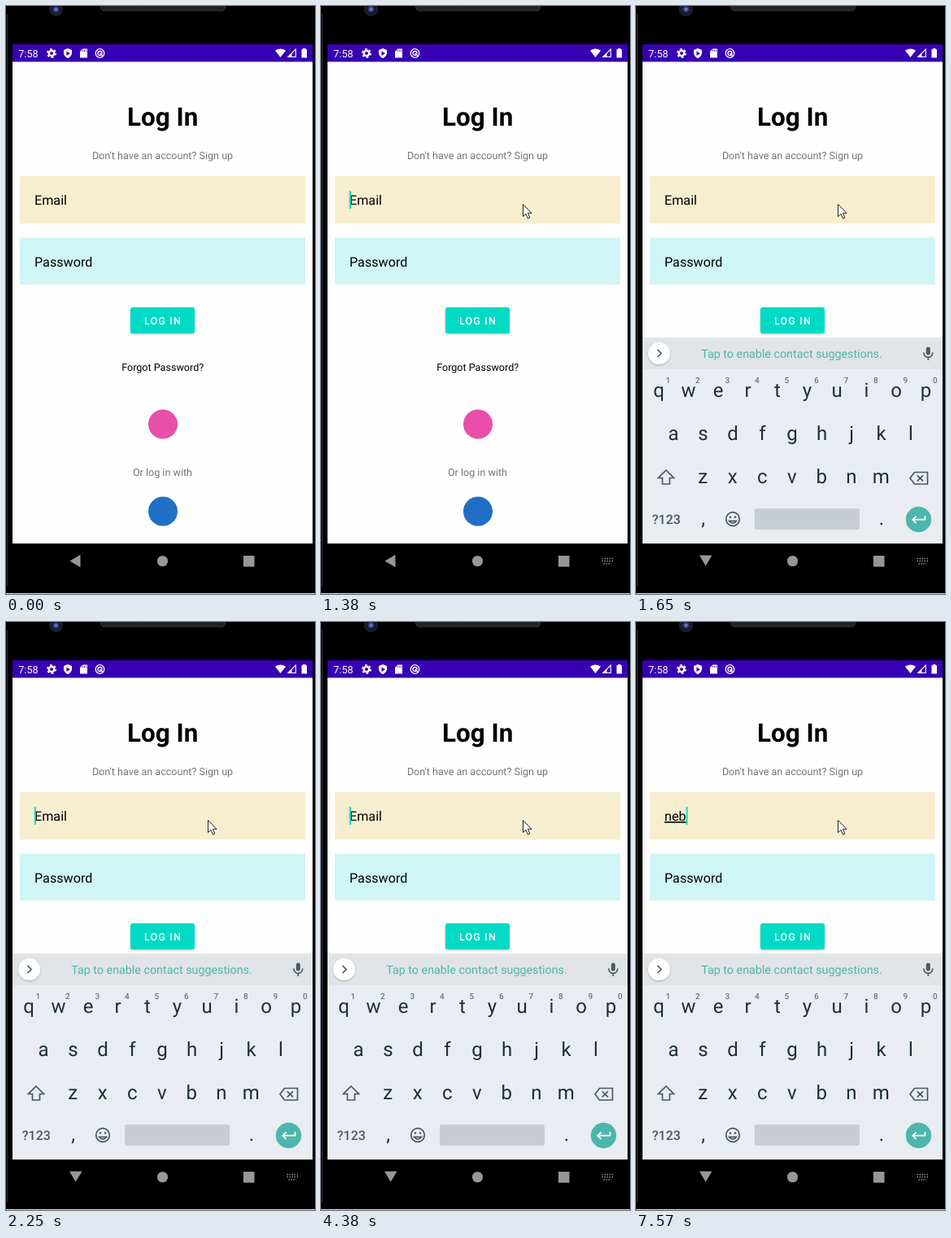
An HTML page for the animation above (8 s loop, 380x722 px).

```html
<!DOCTYPE html>
<html lang="en">
<head>
<meta charset="utf-8">
<title>Log in screen</title>
<style>
html, body { margin: 0; width: 100%; height: 100%; overflow: hidden; background: #000; }
svg { display: block; width: 380px; height: 722px; font-family: Roboto, "Noto Sans", sans-serif; text-rendering: geometricPrecision; }
.mid { text-anchor: middle; }
.small { font-size: 12.57px; }
.field { font-size: 16.16px; }
.grey { fill: #757575; }
.line { fill: none; stroke: #4b585f; stroke-width: 1.7; }
.hide { display: none; }
</style>
</head>
<body>
<svg viewBox="0 0 380 722">
  <defs>
    <radialGradient id="lens">
      <stop offset="0" stop-color="#8f9be0"/>
      <stop offset=".3" stop-color="#34408c"/>
      <stop offset=".6" stop-color="#12152c"/>
      <stop offset="1" stop-color="#25262a"/>
    </radialGradient>
    <filter id="soft" x="-20%" y="-20%" width="140%" height="150%">
      <feDropShadow dx="0" dy="1" stdDeviation="1" flood-opacity=".28"/>
    </filter>
  </defs>

  <!-- phone body -->
  <rect width="380" height="722"/>
  <rect x="1" y="10" width="1" height="702" fill="#343434"/>
  <rect y="721" width="380" height="1" fill="#d5d5d5"/>
  <circle cx="61.5" cy="4" r="8.5" fill="url(#lens)"/>
  <path d="M116 0H270V2Q269 6.5 264 6.5H122Q117 6.5 116 2Z" fill="#29292b"/>
  <path d="M119 2.5H267" stroke="#111" stroke-width="2" stroke-dasharray="1.5 1.5"/>

  <!-- screen -->
  <rect x="8" y="47" width="369" height="613" fill="#fefefe"/>
  <rect x="8" y="47" width="369" height="21.5" fill="#3700b3"/>
  <g fill="#fff">
    <text class="small" x="15.3" y="62.5">7:58</text>
    <g fill="none" stroke="#fff">
      <circle cx="56" cy="58" r="3.2" stroke-width="2.4"/>
      <circle cx="56" cy="58" r="5.1" stroke-width="1.7" stroke-dasharray="2.67 2.67"/>
      <circle cx="115.5" cy="58" r="5.3" stroke-width="1.3"/>
      <circle cx="115.5" cy="58" r="2.5" stroke-width="1.3"/>
      <path d="M115.5 58L119 61.5" stroke-width="1.3"/>
    </g>
    <path d="M76 52L81 54V58Q80.500 62 76 64.200Q71.500 62 71 58V54Z"/>
    <path d="M74.500 55.500L79 58.200L74.500 61Z" fill="#3700b3"/>
    <path d="M94.500 52.500H100V63.500H91V56Z"/>
    <path d="M94.500 54V56M96.500 54V56M98.500 54V56" stroke="#3700b3" stroke-width=".8"/>
    <path d="M331 54.800Q337.500 50.200 344 54.800L337.500 63Z"/>
    <path d="M356.300 53V62.500H346.800Z" fill="none" stroke="#fff" stroke-width="1.100"/>
    <path d="M351.500 58V62.500H346.800Z"/>
    <path d="M365 52H368.500V53.200H370V63.500H363.500V53.200H365Z"/>
  </g>

  <text class="mid" x="192.700" y="147" font-size="31.400" font-weight="700">Log In</text>
  <text class="mid small grey" x="192.500" y="187.500">Don't have an account? Sign up</text>
  <rect x="17" y="209" width="351" height="58" fill="#f7eed0"/>
  <rect x="17" y="284.500" width="351" height="57.500" fill="#d0f5f6"/>
  <text class="field" id="hint" x="35" y="244">Email</text>
  <text class="field hide" id="typed" x="35" y="244" text-decoration="underline">neb</text>
  <text class="field" x="35" y="319.500">Password</text>
  <rect id="caret" x="35" y="227" width="1.800" height="22" fill="#03dac5"/>

  <rect x="153" y="370" width="79" height="32" rx="3" fill="#03dac5" filter="url(#soft)"/>
  <text class="mid small" x="193" y="390.700" fill="#fff" font-weight="500" letter-spacing="1.120">LOG IN</text>
  <text class="mid small" x="192.700" y="448">Forgot Password?</text>
  <circle cx="193" cy="513.500" r="18" fill="#e94fa8"/>
  <text class="mid small grey" x="192.500" y="577">Or log in with</text>
  <circle cx="193" cy="620.500" r="18" fill="#1f6fc5"/>

  <!-- navigation bar -->
  <g fill="#979797">
    <path id="back"/>
    <circle cx="192.500" cy="681.500" r="6.600"/>
    <rect x="292" y="675" width="13.500" height="13.500"/>
    <path id="keysIcon" d="M345.500 678.500H359M345.500 681.500H359M347.500 684.800H357" stroke="#979797" stroke-width="1.500" stroke-dasharray="1.500 1.500"/>
  </g>

  <g id="board">
    <rect x="8" y="407" width="369" height="253" fill="#e9edf1"/>
    <rect x="8" y="407" width="369" height="39" fill="#e0e4e7"/>
    <circle cx="28.500" cy="426.500" r="13.500" fill="#fff" filter="url(#soft)"/>
    <path class="line" d="M26.500 422L31 426.500L26.500 431"/>
    <text class="mid" x="191.500" y="432" font-size="14.300" fill="#4db6ac">Tap to enable contact suggestions.</text>
    <rect x="356.800" y="418.500" width="5" height="10" rx="2.500" fill="#4b585f"/>
    <path class="line" d="M353.800 425.500Q354.300 431.300 359.300 431.300T364.800 425.500M359.300 431V435" stroke-width="1.400"/>
    <g id="keys" fill="#1f2f37"></g>
    <path class="line" d="M37 570L46.500 579.500H41.500V587H32.500V579.500H27.500Z"/>
    <path class="line" d="M342.500 572.500H358.500V587H342.500L337 579.800Z"/>
    <path class="line" d="M345.800 576.300L353 583.400M353 576.300L345.800 583.400"/>
    <circle class="line" cx="119" cy="630" r="8.300"/>
    <path class="line" d="M114.500 632.300Q119 638 123.500 632.300Z" stroke-width="1"/>
    <circle cx="116" cy="627.500" r="1.300" fill="#4b585f"/>
    <circle cx="122" cy="627.500" r="1.300" fill="#4b585f"/>
    <rect x="146" y="617" width="129" height="26" rx="3" fill="#c8cdd1"/>
    <circle cx="347.500" cy="630.500" r="15.700" fill="#4db6ac"/>
    <path d="M355.500 626V630.700H340.500M344.500 626.500L340.300 630.700L344.500 634.900" fill="none" stroke="#fff" stroke-width="1.800"/>
  </g>

  <path id="mouse" d="M.5 .5V15.500L4 12.300L6.500 18L8.800 17L6.300 11.300H11Z" fill="#fff" stroke="#222" stroke-width="1"/>
</svg>
<script>
const LOOP = 8000;
const $ = id => document.getElementById(id);
const show = (id, on) => $(id).classList.toggle('hide', !on);

function label(text, x, y, size, extra = {}) {
  const el = document.createElementNS('http://www.w3.org/2000/svg', 'text');
  const attrs = { x, y, 'font-size': size, class: 'mid', ...extra };
  for (const k in attrs) el.setAttribute(k, attrs[k]);
  el.textContent = text;
  $('keys').append(el);
}

const rows = [['qwertyuiop', 28, 480], ['asdfghjkl', 46, 533], ['zxcvbnm', 82.3, 586]];
for (const [letters, x, y] of rows)
  [...letters].forEach((c, i) => label(c, x + 36.5 * i, y, 24));
[...'1234567890'].forEach((c, i) =>
  label(c, 39.3 + 36.5 * i, 463, 10, { fill: '#68737a', 'font-weight': 500 }));
label('?123', 37.3, 636, 16, { fill: '#4b585f', 'font-weight': 500 });
label(',', 82.5, 637, 24);
label('.', 302, 637, 24);

// [start ms, value]
const mouseSteps = [[0, null], [500, [369, 284]], [620, [328, 257]], [740, [293, 236]],
  [890, [264, 240]], [1010, [248, 243]]];
const boardSteps = [[0, null], [1500, [7, .82]], [1650, [0, 1]]];
const caretSteps = [[0, 0], [1260, 1], [1650, 0], [2250, 1], [2650, 0], [3180, 1],
  [3750, 0], [4380, 1], [4940, 0], [5370, 1]];

const at = (steps, t) => steps.filter(s => s[0] <= t).pop()[1];

function draw(t) {
  const mouse = at(mouseSteps, t), board = at(boardSteps, t), typed = t >= 7570;
  show('mouse', mouse);
  if (mouse) $('mouse').setAttribute('transform', `translate(${mouse})`);
  show('board', board);
  if (board) {
    $('board').setAttribute('transform', `translate(0 ${board[0]})`);
    $('board').setAttribute('opacity', board[1]);
  }
  show('caret', at(caretSteps, t));
  $('caret').setAttribute('x', typed ? 61.7 : 35);
  show('hint', !typed);
  show('typed', typed);
  show('keysIcon', t >= 1380);
  $('back').setAttribute('d', board ? 'M78 674.5H93.5L85.700 687.500Z' : 'M78.500 681.500L91.500 673.700V689.300Z');
}

const start = performance.now();
function tick() {
  draw((performance.now() - start) % LOOP);
  requestAnimationFrame(tick);
}
tick();
</script>
</body>
</html>
```
